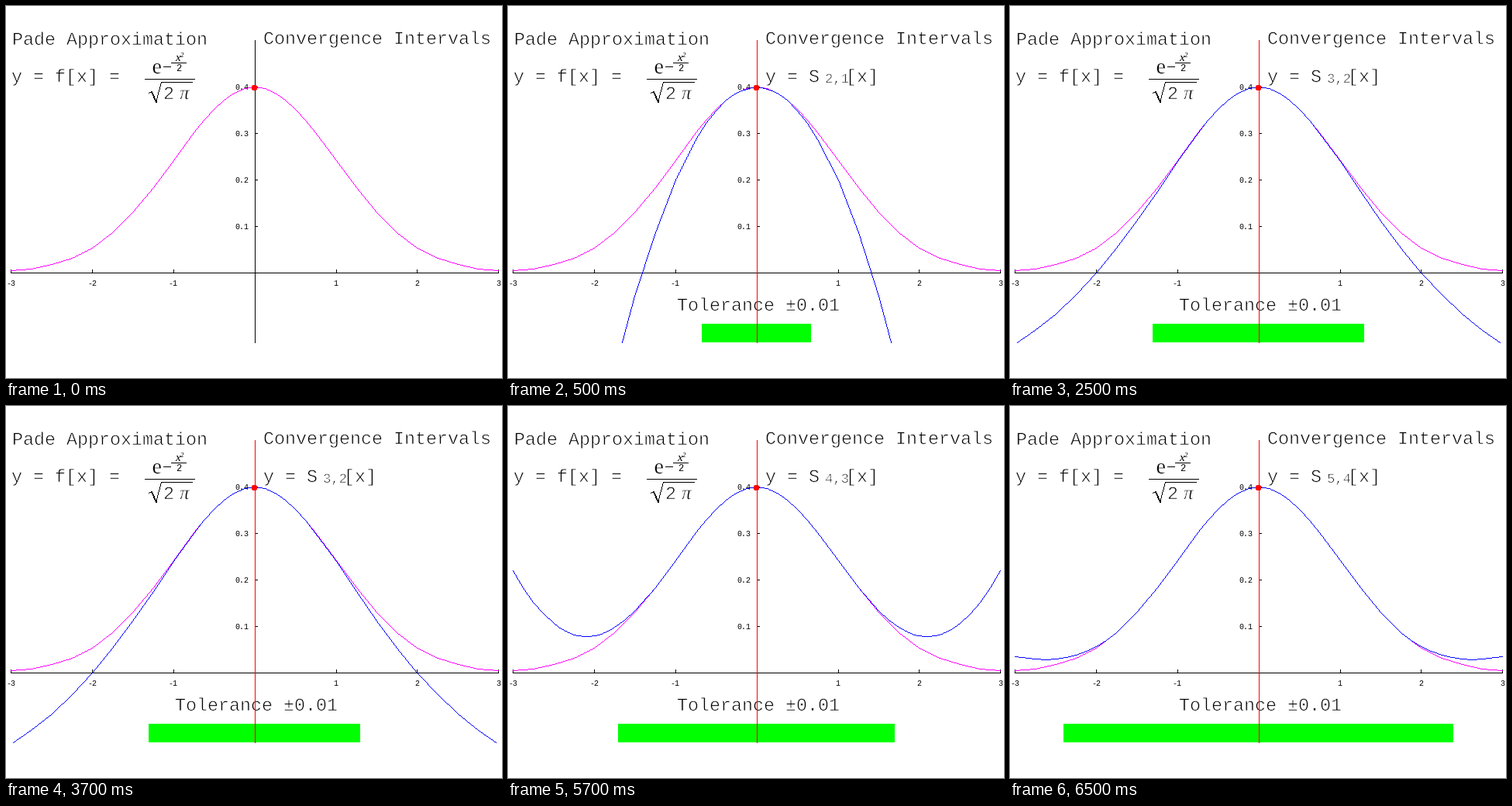
A matplotlib script that plays this animation: 640 px wide and 480 px high, repeating every 8 s.

```python
import numpy as np
import matplotlib.pyplot as plt
import matplotlib.patheffects as pe
from matplotlib.animation import FuncAnimation
from matplotlib.patches import Circle, Rectangle

W, H, DPI = 640, 480, 100
PT = 72 / DPI  # points per pixel
BOTTOM = 434   # last pixel row of the plot
MONO, SERIF = "Liberation Mono", "Liberation Serif"

plt.rcParams["path.simplify"] = False
fig = plt.figure(figsize=(W / DPI, H / DPI), dpi=DPI, facecolor="white")
ax = fig.add_axes([0, 0, 1, 1])
ax.set(xlim=(0, W), ylim=(H, 0))
ax.axis("off")


def px(x):
    return 320.7 + 104.83 * x


def py(y):
    return 344 - 600 * y


def raster(xs, ys):
    """Turn a polyline into one short dash per pixel, for crisp one-pixel lines."""
    xs, ys = np.round(xs), np.round(ys)
    cols, rows = [], []
    for x0, y0, x1, y1 in zip(xs, ys, xs[1:], ys[1:]):
        n = int(max(abs(x1 - x0), abs(y1 - y0))) + 1
        cols.append(np.linspace(x0, x1, n))
        rows.append(np.linspace(y0, y1, n))
    col, row = np.round(np.concatenate(cols)), np.round(np.concatenate(rows))
    keep = row <= BOTTOM
    col, row = col[keep], row[keep]
    gap = np.full_like(col, np.nan)
    return (np.column_stack([col + 0.2, col + 0.8, gap]).ravel(),
            np.column_stack([row + 0.5, row + 0.5, gap]).ravel())


def line(xs, ys, color="black", z=3):
    return ax.plot(*raster(xs, ys), color=color, lw=0.5 * PT, antialiased=False,
                   snap=False, solid_capstyle="butt", zorder=z)[0]


def label(x, y, s, size=23.33, family=MONO, thin=0.7, **kw):
    effects = [pe.Stroke(linewidth=thin * PT, foreground="white")] if thin else None
    return ax.text(x, y, s, fontsize=size * PT, family=family, color="black",
                   va="baseline", path_effects=effects, **kw)


def sample(f):
    """Plot points at even steps, refined where the curve bends sharply."""
    xs = np.linspace(-3, 3, 25)
    for _ in range(3):
        angle = np.arctan2(np.diff(py(f(xs))), np.diff(px(xs)))
        sharp = np.abs(np.diff(angle)) > np.radians(10)
        split = np.append(sharp, False) | np.insert(sharp, 0, False)
        middle = (xs[:-1] + xs[1:]) / 2
        xs = np.sort(np.append(xs, middle[split]))
    return px(xs), py(f(xs))


def draw_axes():
    line([6, 635], [344, 344])
    for n in range(-3, 4):
        if n:
            x = px(n)
            line([x, x], [340, 344])
            label(x, 361, str(n), 10, thin=0, ha="center")
    for n in range(1, 5):
        y = py(n / 10)
        line([321, 324], [y, y])
        label(313.5, y + 3.5, f"{n / 10}", 10, thin=0, ha="right")
    return line([321, 321], [44, BOTTOM], z=6)


def draw_formula():
    label(7, 98, "y = f[x] =")
    label(188.5, 87, "e", 28, SERIF, thin=0.4)
    line([203, 212], [78, 78])
    label(218, 71, "x", 15, SERIF, thin=0, style="italic")
    label(225, 66, "2", 9, SERIF, thin=0, style="italic")
    line([213, 232], [73, 73])
    label(219, 84, "2", 12, thin=0)
    line([179, 243], [94, 94])
    line([184, 187, 193, 200, 240], [112, 110, 124, 98, 98])
    line([188, 194], [110, 124])
    label(203, 120, "2")
    label(224, 120, "\u03c0", 25, SERIF, thin=0.5, style="italic")


PEAK = 1 / np.sqrt(2 * np.pi)


def bell(x):
    return PEAK * np.exp(-x**2 / 2)


# Pade approximants of exp(-t) with t = x^2 / 2, and the tolerance half-widths
STAGES = [
    ("2,1", lambda t: 1 - t, 0.672),
    ("3,2", lambda t: (1 - t / 2) / (1 + t / 2), 1.302),
    ("4,3", lambda t: (1 - 2 * t / 3 + t**2 / 6) / (1 + t / 3), 1.702),
    ("5,4", lambda t: (1 - t / 2 + t**2 / 12) / (1 + t / 2 + t**2 / 12), 2.399),
]

label(8, 50, "Pade Approximation")
label(332, 49, "Convergence Intervals")
draw_formula()
v_axis = draw_axes()

line(*sample(bell), "#ff00ff", z=4)
approx = line(*sample(bell), "#0000ff", z=5)
ax.add_patch(Circle((320.5, 105.5), 3, fc="#ff0000", lw=0, antialiased=False,
                    zorder=7))

bar = ax.add_patch(Rectangle((0, 410), 0, 24, fc="#00ff00", lw=0, zorder=2))
index = label(409, 99, "", 17.2)
extras = [approx, bar, index, label(332, 98, "y = S"), label(436, 98, "[x]"),
          label(218, 393, "Tolerance \u00b10.01")]


def update(k):
    stage = (k + 3) // 4
    for artist in extras:
        artist.set_visible(stage > 0)
    v_axis.set_color("#ff0000" if stage else "black")
    if stage:
        name, ratio, half = STAGES[stage - 1]
        index.set_text(name)
        approx.set_data(*raster(*sample(lambda x: PEAK * ratio(x**2 / 2))))
        reach = 104.83 * half
        bar.set_x(320.5 - reach)
        bar.set_width(2 * reach)
    return extras + [v_axis]


anim = FuncAnimation(fig, update, frames=16, interval=500, repeat=True,
                     repeat_delay=0, blit=False)
plt.show()
```
